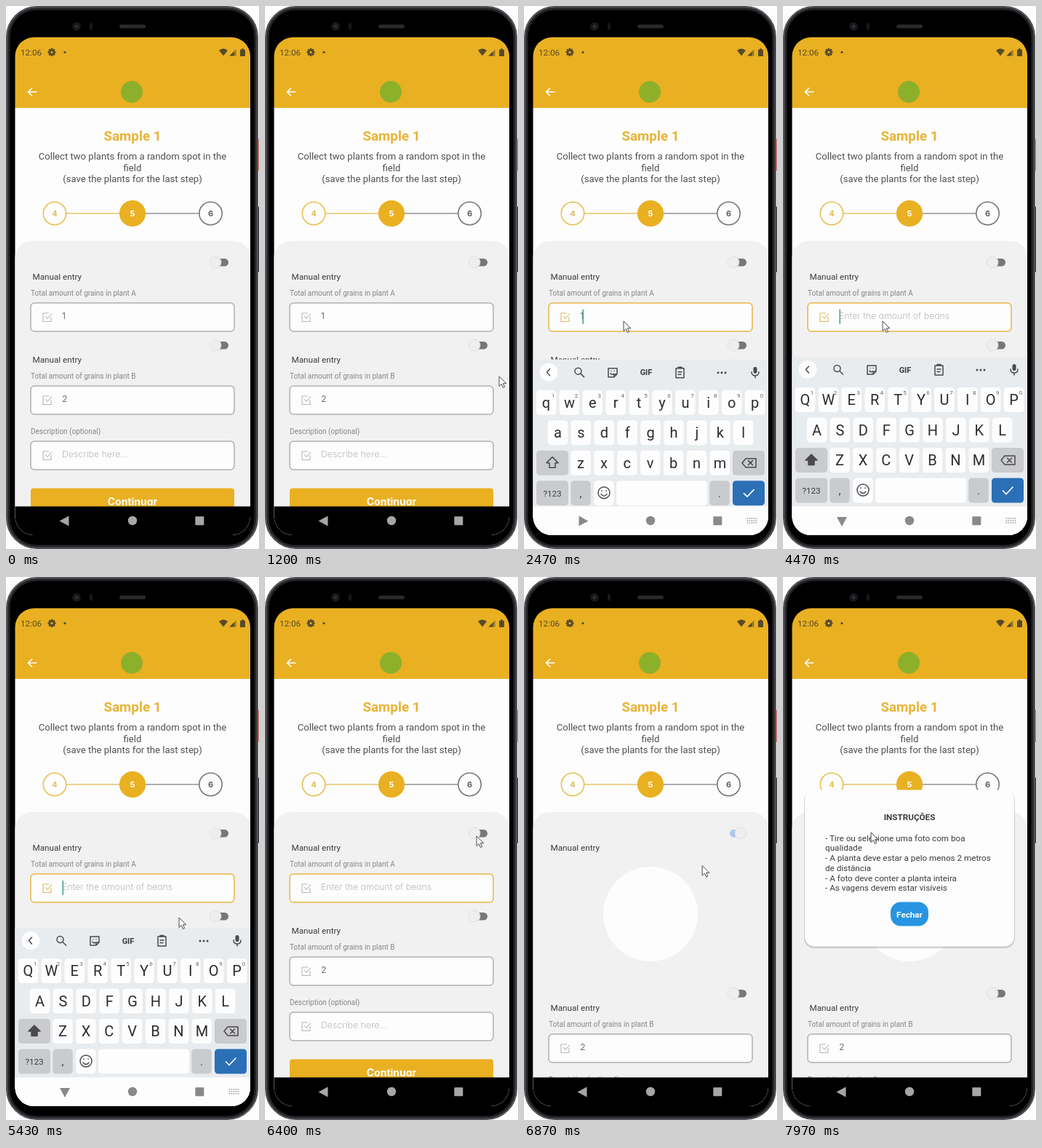
An HTML page for the animation above (8 s loop, 348 px wide and 746 px high).

```html
<!DOCTYPE html>
<html lang="en">
<head>
<meta charset="utf-8">
<title>Sample form</title>
<style>
  html, body { margin: 0; width: 100%; height: 100%; overflow: hidden; background: #fdfdfd; }
  svg { display: block; width: 100%; height: 100%; }
  text { font-family: Roboto, sans-serif; font-size: 11.7px; fill: #3c3c3e; }
  .mid { text-anchor: middle; }
  .bold { font-weight: 700; }
  .body { font-size: 13.1px; fill: #505052; }
  .label { font-size: 10px; fill: #858587; }
  .input { font-family: Inter, sans-serif; font-size: 12.3px; font-feature-settings: "cv11"; fill: #727276; }
  .hint { fill: #b9b9bb; font-weight: 300; }
  .key { font-size: 20px; fill: #2c2c2e; }
  .digit { font-size: 8px; fill: #66666a; }
  .line { fill: none; stroke: #4a4a4d; stroke-width: 1.5; stroke-linejoin: round; stroke-linecap: round; }
</style>
</head>
<body>
<svg id="stage" viewBox="0 0 348 746"></svg>
<script>
const LOOP = 8000;
const TAP_FIELD = 2150, KEYS_IN = 2330, ERASE = 3400, KEYS_OUT = 6020;
const TAP_SWITCH = 6460, SWAP = 6670, TAP_PHOTO = 7200;
const GOLD = '#e9b022', PAPER = '#fdfdfd', PANEL = '#f1f1f1', GREY = '#cacbce';

const text = (x, y, s, cls = '', attrs = '') => `<text x="${x}" y="${y}" class="${cls}" ${attrs}>${s}</text>`;
const rect = (x, y, w, h, r, fill, attrs = '') =>
  `<rect x="${x}" y="${y}" width="${w}" height="${h}" rx="${r}" fill="${fill}" ${attrs}/>`;
const circle = (x, y, r, fill, attrs = '') => `<circle cx="${x}" cy="${y}" r="${r}" fill="${fill}" ${attrs}/>`;
const path = (d, attrs = 'class="line"') => `<path d="${d}" ${attrs}/>`;
const group = (id, content, attrs = '') => `<g id="${id}" ${attrs}>${content}</g>`;

const step = (x, n, r, ring, fill, ink) =>
  circle(x, 285, r, fill, `stroke="${ring}" stroke-width="1.6"`) +
  text(x, 289, n, 'mid bold input', `style="fill:${ink};font-size:11px"`);

const toggle = (y, name = '') =>
  rect(283, y - 5, 23, 10.5, 5.2, '#77777a', name && `id="${name}Track"`) +
  (name ? circle(298, y, 0, '#b0b0b2', `id="${name}Ripple"`) : '') +
  circle(288, y, 8, '#eeeeee', `stroke="#dedede" stroke-width=".8" ${name && `id="${name}Thumb"`}`);

const field = (y, content, id = '') =>
  rect(34, y, 280, 39, 5, PAPER, `stroke="#b1b1b3" stroke-width="1.5" ${id && `id="${id}"`}`) +
  path(`M62 ${y + 19}v6.5h-11v-11.5h8M54 ${y + 18}l3 3.5 6-7`, 'fill="none" stroke="#b8b6ae" stroke-width="1.1"') +
  content;

function phone() {
  return rect(343, 182, 5, 45, 1.5, '#ea7f70') + rect(343, 275, 5, 91, 1.5, '#38383c') +
    rect(1.5, 1.5, 344, 743, 41, '#000', 'stroke="#505055" stroke-width="3"') +
    rect(4, 4, 339, 738, 38.5, 'none', 'stroke="#252529" stroke-width="3"') +
    circle(97, 28, 6, '#17171b') + circle(97, 28, 2.5, '#2d2d35') +
    rect(115, 23, 4, 10, 2, '#17171b') + rect(156, 25.5, 36, 5, 2.5, '#2a2a2d');
}

function header() {
  const ink = '#574a28';
  const teeth = [0, 45, 90, 135].map(a =>
    rect(61.7, 58, 2.6, 11, 0.5, ink, `transform="rotate(${a} 63 63.5)"`)).join('');
  return rect(12, 43, 325, 97, 0, GOLD) +
    text(20, 68, '12:06', '', `style="fill:${ink}"`) +
    teeth + circle(63, 63.5, 4, ink) + circle(63, 63.5, 1.6, GOLD) + circle(81, 63.5, 1.6, ink) +
    path('M293 61q6-5 12 0l-6 7.5z', `fill="${ink}"`) +
    path('M307.5 68.5h9v-9z', `fill="${ink}" fill-opacity=".55"`) + path('M307.5 68.5h6v-6z', `fill="${ink}"`) +
    path('M322 60h2v-1.5h3v1.5h2v9h-7z', `fill="${ink}"`) +
    path('M42.5 118h-12m5.5-5.5l-5.5 5.5 5.5 5.5', `fill="none" stroke="${PAPER}" stroke-width="1.7"`) +
    circle(173, 118, 15, '#8db02a');
}

function page() {
  const fieldA = text(34, 398, 'Total amount of grains in plant A', 'label') +
    field(408, text(77, 430, '1', 'input', 'id="value"') +
      text(77, 430, 'Enter the amount of beans', 'input hint', 'id="hint"') +
      rect(77.5, 417, 1.5, 20, 0, '#4b9a92', 'id="caret"'), 'boxA');
  const lower = toggle(466) + text(36.5, 489.5, 'Manual entry') +
    text(34, 512, 'Total amount of grains in plant B', 'label') + field(522, text(77, 544, '2', 'input')) +
    text(34, 588, 'Description (optional)', 'label') + field(598, text(77, 620, 'Describe here...', 'input hint')) +
    rect(34, 662.5, 280, 40, 4, GOLD) +
    text(174, 685.5, 'Continuar', 'mid bold input', `style="fill:${PAPER};font-size:14px"`);
  return rect(12, 140, 325, 600, 0, PAPER) +
    text(174, 184.5, 'Sample 1', 'mid bold', 'style="fill:#e8b436;font-size:18.8px"') +
    ['Collect two plants from a random spot in the', 'field', '(save the plants for the last step)']
      .map((s, i) => text(174, 211 + i * 15.6, s, 'mid body')).join('') +
    path('M83 285H158', 'stroke="#e5c46a" stroke-width="1.3"') + path('M190 285H266', 'stroke="#929295" stroke-width="1.3"') +
    step(67, 4, 15.7, '#e8bf52', PAPER, '#e4bb52') + step(174, 5, 17.3, GOLD, GOLD, PAPER) +
    step(281.5, 6, 15.7, '#77777a', PAPER, '#5f5f62') +
    rect(12, 323, 325, 420, 24, PANEL) +
    toggle(352, 'switch') + text(36.5, 375.5, 'Manual entry') +
    group('fieldA', fieldA) + circle(174, 463, 65, PAPER, 'id="photo"') + group('lower', lower);
}

function keyboard() {
  const key = (x, y, w, fill = PAPER) => rect(x - w / 2, y - 17, w, 34, 4.5, fill);
  const rows = ['qwertyuiop', 'asdfghjkl', 'zxcvbnm'].map((row, r) => [...row].map((c, i) => {
    const x = [30.5, 46.5, 78][r] + i * 31.9, y = 541 + r * 41.5;
    return key(x, y, 27.5) + text(x, y + 7, c, 'key mid letter') +
      (r ? '' : text(x + 9.5, y - 7, (i + 1) % 10, 'digit mid'));
  }).join('')).join('');
  const tools = circle(34, 499.5, 12.5, PAPER) + path('M35.5 495l-4 4.5 4 4.5') +
    circle(74.5, 498, 4.5, 'none', 'class="line"') + path('M78 501.5l4.5 4.5') +
    path('M116 494h12v8l-4 4h-8zM128 502h-4v4M119 501q2 3 4 1M120 497.5v.1M124 497.5v.1') +
    text(168, 503.5, 'GIF', 'mid bold', 'style="font-size:11px"') +
    path('M209 494h11v13h-11zM212 494v-1.5h5v1.5M212 499h5M212 502.5h4') +
    [267, 272, 277].map(x => circle(x, 500, 1.5, '#4a4a4d')).join('') +
    rect(315.5, 492, 5, 9, 2.5, '#4a4a4d') + path('M313 499q0 5 5 5t5-5M318 504v3');
  const special = key(39, 624, 44, GREY) + path('M39 616l-8 8h4v6.5h8v-6.5h4z', 'class="line" id="shift"') +
    key(309, 624, 44, GREY) + path('M305 618h14v12h-14l-5-6zM308.5 621l6 6M314.5 621l-6 6') +
    key(39, 665.5, 44, GREY) + text(39, 670, '?123', 'mid') +
    key(78, 665.5, 27.5, GREY) + text(78, 671, ',', 'mid', 'style="font-size:15px"') +
    key(110, 665.5, 27.5) + circle(110, 665, 8, 'none', 'class="line"') +
    path('M106 667q4 5 8 0M107 662v.5M113 662v.5') +
    key(189.5, 665.5, 125) + key(269, 665.5, 27.5, GREY) + text(269, 671, '.', 'mid', 'style="font-size:15px"') +
    key(309, 665.5, 44, '#2b6fb6') + path('M302 665.5l5 5 9.5-10', `fill="none" stroke="${PAPER}" stroke-width="1.7"`);
  return rect(12, 482, 325, 260, 0, '#e8ecef') + tools + rows + special;
}

function navigation() {
  const dots = [0, 1, 2].map(r => [0, 1, 2, 3, 4].map(c =>
    `<rect x="${306.5 + c * 3}" y="${703 + r * 3}" width="1.7" height="1.7"/>`).join('')).join('');
  return rect(12, 687.5, 325, 60, 0, '#000', 'id="navBar"') +
    group('navIcons', path('M73.5 707.5l13-7v14z', 'id="back"') + '<circle cx="174" cy="707" r="6.2"/>' +
      '<rect x="260.3" y="701.3" width="12" height="12" rx="1"/>' + group('navKeys', dots, 'opacity=".7"'));
}

function dialog() {
  const lines = ['- Tire ou selecione uma foto com boa', 'qualidade', '- A planta deve estar a pelo menos 2 metros',
    'de distância', '- A foto deve conter a planta inteira', '- As vagens devem estar visíveis'];
  return rect(29, 293, 290, 217, 14, '#808083', 'opacity=".35"') + rect(30, 292.5, 288, 215, 13, PAPER) +
    text(174, 333.5, 'INSTRUÇÕES', 'mid bold') +
    lines.map((s, i) => text(58, 362.5 + i * 13.75, s)).join('') +
    rect(148, 446.5, 52, 33, 14, '#2795e2') + text(174, 467.5, 'Fechar', 'mid bold', `style="fill:${PAPER}"`);
}

const stage = document.getElementById('stage');
stage.innerHTML = `<clipPath id="screen">${rect(12.5, 43, 323.5, 684, 26, '#000')}</clipPath>` + phone() +
  `<g clip-path="url(#screen)">${page() + header() + group('dialog', dialog()) + group('keyboard', keyboard()) + navigation()}</g>` +
  group('pointer', path('M0 0v13.5l3.2-3 2.3 5 2.2-1-2.3-4.8h4.4z', `fill="${PAPER}" stroke="#4c4c50"`));

const el = {};
stage.querySelectorAll('[id]').forEach(node => el[node.id] = node);
const letters = [...stage.querySelectorAll('.letter')];

const show = (node, on) => node.style.display = on ? '' : 'none';
const set = (node, name, value) => node.setAttribute(name, value);
const progress = (t, start, length) => Math.min(1, Math.max(0, (t - start) / length));
const smooth = p => p * p * (3 - 2 * p);
const easeOut = p => 1 - (1 - p) ** 3;

// Pointer stops: time, x, y
const stops = [[1000, 349, 520], [1900, 137, 433], [5050, 137, 433], [5430, 238, 468], [5900, 291, 356],
  [6680, 291, 356], [7100, 185, 450], [7350, 185, 450], [7900, 121, 351], [LOOP, 121, 351]];

function pointerAt(t) {
  const i = Math.max(1, stops.findIndex(s => s[0] >= t));
  const [a, b] = [stops[i - 1], stops[i]];
  const p = smooth(progress(t, a[0], b[0] - a[0]));
  return [a[1] + (b[1] - a[1]) * p, a[2] + (b[2] - a[2]) * p];
}

function draw(t) {
  const focused = t >= TAP_FIELD, erased = t >= ERASE, swapped = t >= SWAP;
  const typing = focused && t < KEYS_OUT;

  show(el.value, !erased);
  show(el.hint, erased);
  set(el.boxA, 'stroke', focused ? '#e9b74a' : '#b1b1b3');
  set(el.boxA.nextElementSibling, 'stroke', typing ? '#dfb85a' : '#b8b6ae');
  const blink = (t - (erased ? ERASE : TAP_FIELD)) % 1000 < 500;
  show(el.caret, typing && blink);
  set(el.caret, 'x', erased ? 77.5 : 80.5);

  const opening = progress(t, KEYS_IN, 187), closing = progress(t, KEYS_OUT, 200);
  const drop = 245 * (1 - easeOut(opening) + closing ** 2);
  const keysVisible = opening > 0 && closing < 1;
  show(el.keyboard, keysVisible);
  set(el.keyboard, 'transform', `translate(0 ${drop})`);
  letters.forEach(l => {
    const c = erased ? l.textContent.toUpperCase() : l.textContent.toLowerCase();
    if (c !== l.textContent) l.textContent = c;
  });
  el.shift.style.fill = erased ? '#4a4a4d' : 'none';

  set(el.navBar, 'fill', keysVisible ? PAPER : '#000');
  set(el.navIcons, 'fill', keysVisible ? '#89898c' : '#a6a6a8');
  show(el.navKeys, t >= 2250 && closing < 1);
  set(el.back, 'transform', `rotate(${270 * progress(t, KEYS_IN, 210) * (1 - closing)} 81 707.5)`);

  const slide = smooth(progress(t, TAP_SWITCH, 120));
  set(el.switchThumb, 'cx', 288 + 10 * slide);
  set(el.switchTrack, 'fill', slide > 0.5 ? '#a9c8ee' : '#77777a');
  set(el.switchRipple, 'r', 16.5 * slide);
  set(el.switchRipple, 'opacity', 0.9 * (1 - progress(t, SWAP, 200)));

  show(el.fieldA, !swapped);
  show(el.photo, swapped);
  set(el.lower, 'transform', `translate(0 ${swapped ? 106 : 0})`);
  const rise = easeOut(progress(t, TAP_PHOTO, 300));
  show(el.dialog, rise > 0);
  set(el.dialog, 'transform', `translate(0 ${645 * (1 - rise)})`);

  show(el.pointer, t >= stops[0][0]);
  set(el.pointer, 'transform', `translate(${pointerAt(t)})`);
}

function tick() {
  draw(performance.now() % LOOP);
  requestAnimationFrame(tick);
}
tick();
</script>
</body>
</html>
```
